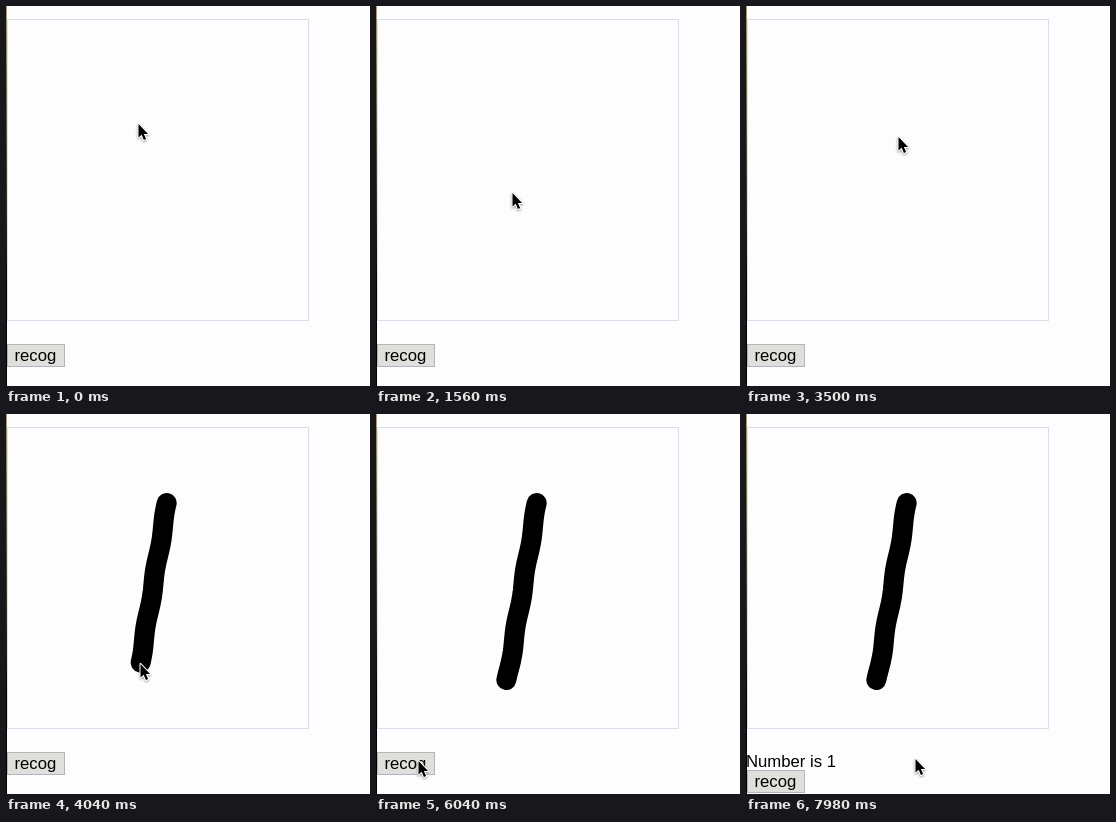
An HTML page for the animation above (8000 ms loop, 364 by 380 pixels).

```html
<!DOCTYPE html>
<html lang="en">
<head>
<meta charset="utf-8">
<title>Digit recognition</title>
<style>
  html, body { margin: 0; width: 100%; height: 100%; overflow: hidden; background: #fdfdfd; }
  svg { display: block; }
  text { font: 16.7px "Liberation Sans", Arial, sans-serif; }
  #cursor { filter: drop-shadow(0 1px 1px #0006); }
</style>
</head>
<body>
<svg width="364" height="380" viewBox="0 0 364 380">
  <linearGradient id="edge" x2="0" y2="1">
    <stop stop-color="#a89c78"/>
    <stop offset=".75" stop-color="#000"/>
  </linearGradient>
  <rect width="1" height="380" fill="url(#edge)"/>
  <rect x="1.5" y="13.5" width="301" height="301" fill="none" stroke="#dcdcec"/>
  <polyline id="ink" fill="none" stroke="#000" stroke-width="20" stroke-linecap="round" stroke-linejoin="round"/>
  <text id="result" x="0" y="353">Number is 1</text>
  <g id="button">
    <rect id="face" x="1.5" y="338.5" width="57" height="22" stroke="#b4b4bc"/>
    <text x="8.5" y="355">recog</text>
  </g>
  <path id="cursor" d="M0 0V13.6L3.2 10.8L5.4 16L7.6 15L5.4 9.9H9.6Z"
    stroke="#fff" stroke-width="2" paint-order="stroke" stroke-linejoin="round"/>
</svg>
<script>
const LOOP = 8000, PEN_DOWN = 3700, PEN_UP = 4340;
const $ = id => document.getElementById(id);

// Pointer moves: when each starts and ends, where it arrives, how far it sags on the way
const moves = [
  { from: 160,  to: 680,  x: 151, y: 72 },
  { from: 980,  to: 1680, x: 135, y: 195 },
  { from: 2240, to: 2940, x: 146, y: 160 },
  { from: 3340, to: 3700, x: 161, y: 89 },
  { from: 3700, to: 4060, x: 134, y: 250 },
  { from: 4180, to: 4340, x: 131, y: 266 },
  { from: 4740, to: 5180, x: 18,  y: 364, sag: 14 },
  { from: 5620, to: 6040, x: 42,  y: 346 },
  { from: 7420, to: 7980, x: 169, y: 344 }
];

const ease = k => k * k * (3 - 2 * k);

function pointer(t) {
  let x = 132, y = 117;
  for (const m of moves) {
    const k = ease(Math.min(1, Math.max(0, (t - m.from) / (m.to - m.from))));
    x += (m.x - x) * k;
    y += (m.y - y) * k + 4 * (m.sag || 0) * k * (1 - k);
  }
  return [x, y];
}

// The pen follows the pointer with a slightly unsteady hand
function inkUntil(t) {
  const points = [];
  for (let s = PEN_DOWN; s <= Math.min(t, PEN_UP); s += 10) {
    const [x, y] = pointer(s);
    points.push([x + 0.7 * Math.sin(y / 9), y]);
  }
  return points.join(" ");
}

function draw(t) {
  const [x, y] = pointer(t).map(Math.round);
  const done = t >= 7160, pressed = t >= 6840 && t < 7020;
  $("cursor").setAttribute("transform", `translate(${x + 0.5} ${y + 1})`);
  $("ink").setAttribute("points", inkUntil(t));
  $("result").setAttribute("visibility", done ? "visible" : "hidden");
  $("button").setAttribute("transform", `translate(0 ${done ? 18 : 0})`);
  $("face").setAttribute("fill", pressed ? "#c2c2c2" : "#dfdfdc");
}

const start = performance.now();
function frame() {
  draw((performance.now() - start) % LOOP);
  requestAnimationFrame(frame);
}
frame();
</script>
</body>
</html>
```
